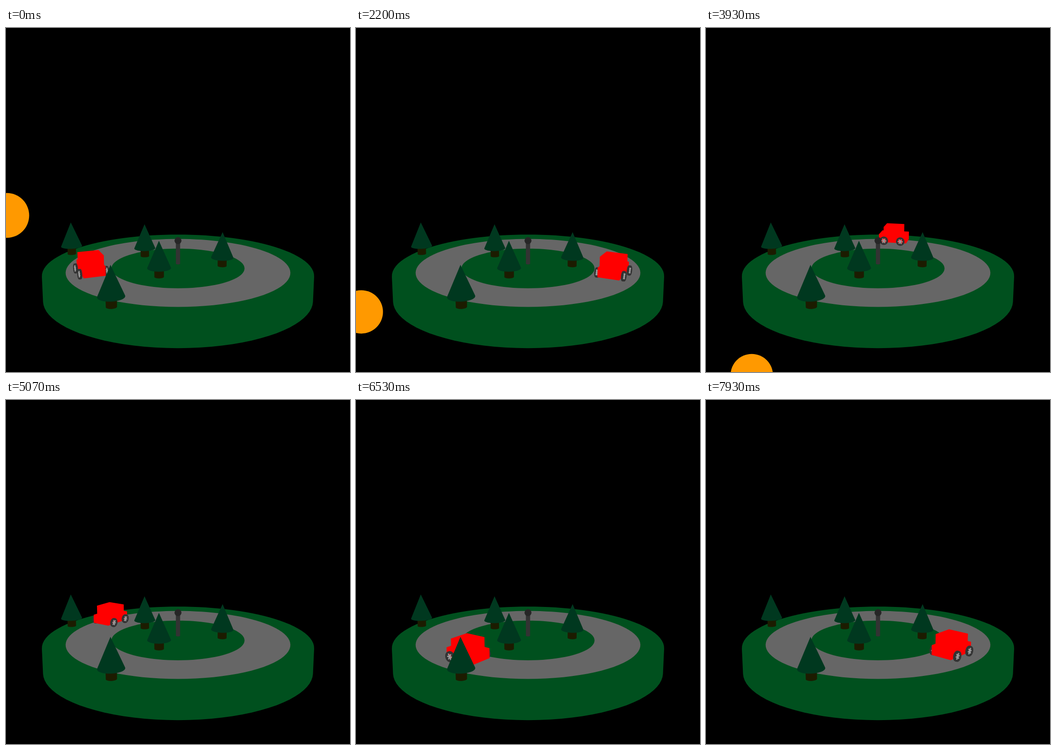
Animation of 748x748 px, one loop 8 s. Source, as an HTML page with a canvas:

```html
<!DOCTYPE html>
<html lang="en">
<head>
<meta charset="utf-8">
<title>Round trip</title>
<style>
html, body { margin: 0; height: 100%; overflow: hidden; background: #000; }
canvas { display: block; }
</style>
</head>
<body>
<canvas id="stage" width="748" height="748"></canvas>
<script>
const ctx = document.getElementById('stage').getContext('2d');
const TAU = Math.PI * 2, LOOP = 8000;

// Camera: focal length in px, distance and drop of the ground centre, pitch.
const FOCAL = 1163, DIST = 24.3, DROP = 3, SIN = 0.1744, COS = 0.9847;
const COLORS = {
  grass: '#00501e', road: '#666', cone: '#00381f', trunk: '#1c1c00',
  pole: '#333', ball: '#262626', car: '#f00', tyre: '#333', spoke: '#999', sun: '#ff9900'
};
const TREES = [[-5.215, -2.02], [-1.603, -1.62], [2.005, -0.02], [-0.802, 1.56], [-2.412, 5]];

function project([x, y, z]) {
  const scale = FOCAL / (DIST - y * SIN - z * COS);
  return [374 + x * scale, 374 + (DROP - y * COS + z * SIN) * scale, scale];
}

function trace(points) {
  ctx.beginPath();
  for (const [x, y] of points) ctx.lineTo(x, y);
  ctx.closePath();
}

function circle(x, y, z, r) {
  return Array.from({ length: 96 }, (_, i) =>
    [x + r * Math.cos(i / 96 * TAU), y, z + r * Math.sin(i / 96 * TAU)]);
}

function convexHull(points) {
  const sorted = [...points].sort((p, q) => p[0] - q[0] || p[1] - q[1]);
  const chain = list => {
    const out = [];
    for (const p of list) {
      while (out.length > 1) {
        const [a, b] = out.slice(-2);
        if ((b[0] - a[0]) * (p[1] - a[1]) - (b[1] - a[1]) * (p[0] - a[0]) > 0) break;
        out.pop();
      }
      out.push(p);
    }
    return out.slice(0, -1);
  };
  return [...chain(sorted), ...chain(sorted.reverse())];
}

// Fills the silhouette of a convex solid.
function solid(points, color) {
  trace(convexHull(points.map(project)));
  ctx.fillStyle = color;
  ctx.fill();
}

function cylinder(x, z, r, bottom, top, color) {
  solid([...circle(x, bottom, z, r), ...circle(x, top, z, r)], color);
}

function ball(x, y, z, r, color) {
  const [sx, sy, scale] = project([x, y, z]);
  ctx.beginPath();
  ctx.arc(sx, sy, r * scale, 0, TAU);
  ctx.fillStyle = color;
  ctx.fill();
}

function tree(x, z) {
  cylinder(x, z, 0.203, 0, 0.4, COLORS.trunk);
  solid([...circle(x, 0.39, z, 0.505), [x, 1.58, z]], COLORS.cone);
}

function pole() {
  cylinder(0, -0.35, 0.097, 0, 1.1, COLORS.pole);
  ball(0, 1.1, -0.35, 0.16, COLORS.ball);
}

function car(angle) {
  const s = Math.sin(angle), c = Math.cos(angle);
  // Car space: ahead along the road, up, and outward from the centre.
  const place = (ahead, up, out) =>
    [(4 + out) * s + ahead * c, up, (4 + out) * c - ahead * s];

  const box = (length, width, bottom, top) => {
    const corners = [];
    for (const a of [-1, 1]) for (const y of [bottom, top]) for (const o of [-1, 1])
      corners.push(place(a * length / 2, y, o * width / 2));
    solid(corners, COLORS.car);
  };

  const wheel = (ahead, side) => {
    const rim = (turn, r, out) => project(
      place(ahead + r * Math.cos(turn), 0.3 + r * Math.sin(turn), side * out));
    const scale = rim(0, 0, 0.57)[2];
    ctx.strokeStyle = COLORS.tyre;
    ctx.lineWidth = 0.085 * scale;
    for (const out of [0.54, 0.57, 0.6]) {
      trace(Array.from({ length: 32 }, (_, i) => rim(i / 32 * TAU, 0.172, out)));
      ctx.stroke();
    }
    ctx.strokeStyle = COLORS.spoke;
    ctx.lineWidth = 0.05 * scale;
    for (let i = 0; i < 3; i++) {
      const turn = -5 * angle + i * TAU / 6;
      trace([rim(turn, 0.135, 0.59), rim(turn, -0.135, 0.59)]);
      ctx.stroke();
    }
  };

  const nearSide = 23.4 * c > 4 ? 1 : -1;
  const axle = side => [0.43, -0.43]
    .sort((a, b) => place(a, 0, 0)[2] - place(b, 0, 0)[2])
    .forEach(ahead => wheel(ahead, side));
  axle(-nearSide);
  box(1.43, 0.92, 0.19, 0.6);
  box(0.93, 0.92, 0.5, 1);
  axle(nearSide);
}

function draw(ms) {
  const sunAngle = -0.298 + Math.PI / 12 * ms / 1000;
  const carAngle = 4 * sunAngle + 0.005;

  ctx.fillStyle = '#000';
  ctx.fillRect(0, 0, 748, 748);
  ball(-8 * Math.cos(sunAngle), -8 * Math.sin(sunAngle), 0, 1, COLORS.sun);

  cylinder(0, 0, 6, -1.12, 0, COLORS.grass);
  solid(circle(0, 0, 0, 5), COLORS.road);
  solid(circle(0, 0, 0, 3), COLORS.grass);

  const items = TREES.map(([x, z]) => ({ z, paint: () => tree(x, z) }));
  items.push({ z: -0.35, paint: pole });
  items.push({ z: 4 * Math.cos(carAngle), paint: () => car(carAngle) });
  items.sort((a, b) => a.z - b.z).forEach(item => item.paint());
}

const start = performance.now();
function tick() {
  draw((performance.now() - start) % LOOP);
  requestAnimationFrame(tick);
}
tick();
</script>
</body>
</html>
```
